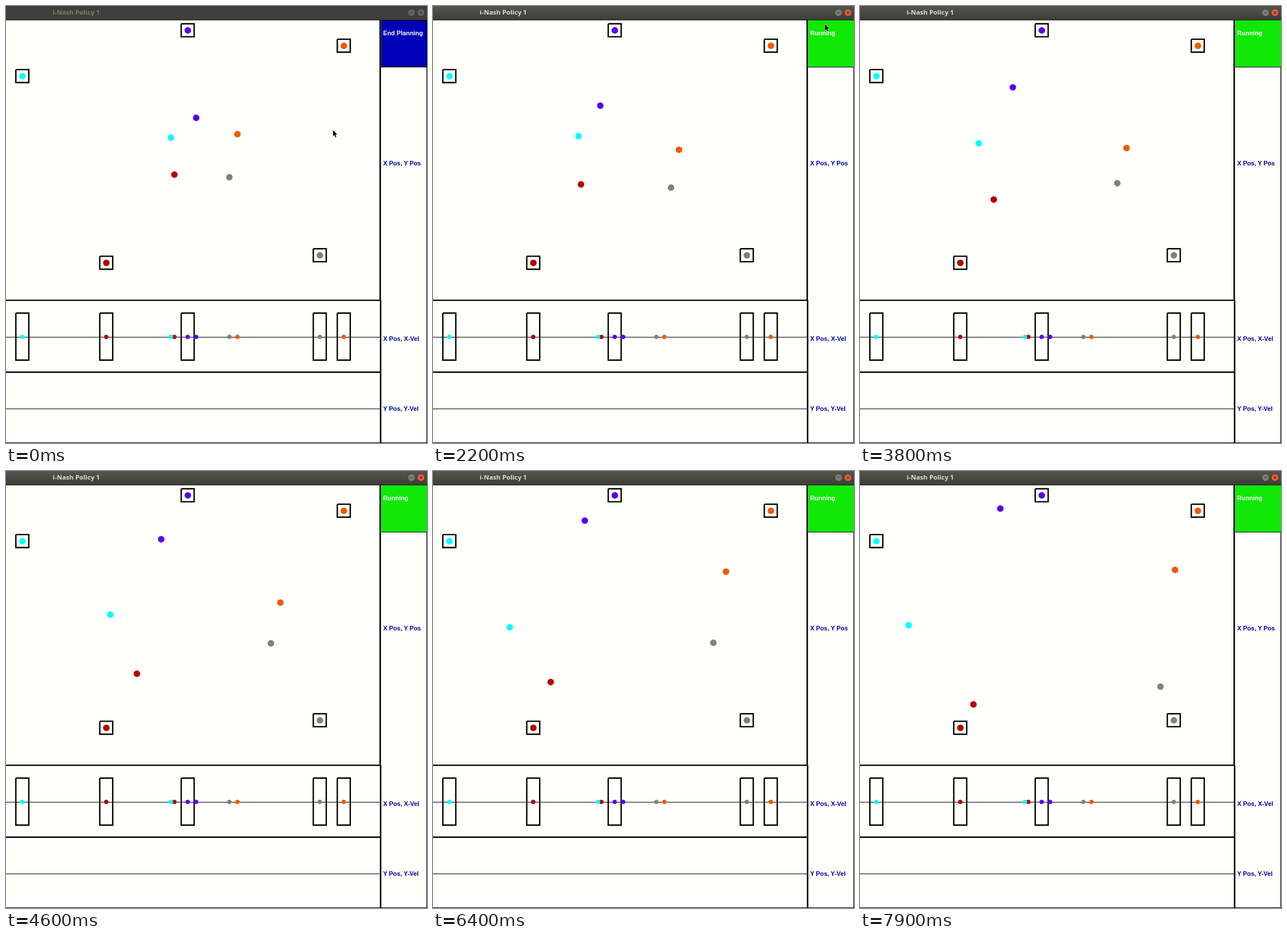
An HTML page for the animation above (8000 ms loop, 735 by 762 pixels).

```html
<!DOCTYPE html>
<html lang="en">
<head>
<meta charset="utf-8">
<title>Policy planner</title>
<style>
  html, body { margin: 0; width: 100%; height: 100%; overflow: hidden; background: #fffffb; }
  svg { display: block; width: 735px; height: 762px; }
  .label { font: bold 10.85px "Liberation Sans", Arial, sans-serif; fill: #0000a0; }
  .title { font: bold 11.4px "Open Sans", "Noto Sans", sans-serif; }
  .box { fill: none; stroke: #000; stroke-width: 2.4; }
</style>
</head>
<body>
<svg id="stage" viewBox="0 0 735 762" xmlns="http://www.w3.org/2000/svg">
  <defs>
    <linearGradient id="bar" x2="0" y2="1">
      <stop offset="0" stop-color="#55544d"/>
      <stop offset="1" stop-color="#3e3d38"/>
    </linearGradient>
  </defs>
  <rect width="735" height="762" fill="#fffffb"/>
  <rect id="head" width="735" height="24"/>
  <rect y="24" width="735" height="1" fill="#1c1c19"/>
  <text id="title" class="title" x="81.5" y="15.3">i-Nash Policy 1</text>
  <g stroke="#34332e" stroke-width=".8">
    <circle id="hide" cx="708" cy="11.5" r="6.5"/>
    <circle id="close" cx="724.5" cy="11.5" r="6.5"/>
  </g>
  <path d="M705 11.5h6M722.2 9.2l4.6 4.6m0-4.6l-4.6 4.6" stroke="#3c3b37" stroke-width="1.2"/>

  <g id="goals"></g>
  <path d="M0 577.5H653M0 702.5H653" stroke="#000"/>
  <g id="strip"></g>
  <path d="M0 513.1H654M0 638.5H654" stroke="#000" stroke-width="2.4"/>
  <path d="M653.3 25V513M654 513V762" stroke="#000" stroke-width="2.6"/>
  <rect id="button" x="655.5" y="25.5" width="79" height="80"/>
  <path d="M655 106.5H734.5V761.5H0" fill="none" stroke="#000"/>
  <text id="state" class="label" x="658.5" y="50.5" style="fill:#fff"></text>
  <text class="label" x="658.5" y="278">X Pos, Y Pos</text>
  <text class="label" x="658.5" y="584">X Pos, X-Vel</text>
  <text class="label" x="658.5" y="706">Y Pos, Y-Vel</text>
  <g id="agents"></g>
  <path id="cursor" d="M0 0V10.6L2.4 8.4L4.1 12.5L5.8 11.8L4.1 7.8H7.4Z" stroke="#fff" paint-order="stroke"/>
</svg>
<script>
const LOOP = 8000, STEP = 100, CLICK = 1100;
const $ = id => document.getElementById(id);

// Each agent steers through a few waypoints, reached at these times.
const times = [1000, 1500, 3000, 4600, 5400, 6400, 7900];
const agents = [
  { color: '#b40000', goal: [175, 447.7],
    x: [294, 279, 239, 228.5, 203, 205.5, 198],
    y: [294, 303, 321, 353.5, 357.5, 368, 407] },
  { color: '#00ffff', goal: [28.5, 122.2],
    x: [288, 272.5, 232.5, 182, 162.5, 134, 85],
    y: [229.5, 225.5, 231.5, 250.5, 270, 272.5, 269] },
  { color: '#5a00f0', goal: [317.2, 42.3],
    x: [332, 318, 268.5, 271, 267, 265, 245],
    y: [195, 181, 164, 119, 112, 86.5, 65.5] },
  { color: '#808080', goal: [547.8, 434.6],
    x: [390, 399, 434, 462.5, 472.5, 489.5, 524.5],
    y: [298.5, 312.5, 316.5, 300.5, 301, 299.5, 376] },
  { color: '#f05a00', goal: [589.7, 69.2],
    x: [404, 413, 448, 479, 476.5, 511.5, 550],
    y: [223.5, 237.5, 258, 229.5, 205, 175.5, 172.5] }
];

function add(parent, tag, attrs) {
  const el = document.createElementNS('http://www.w3.org/2000/svg', tag);
  for (const k in attrs) el.setAttribute(k, attrs[k]);
  return $(parent).appendChild(el);
}

const dot = (parent, cx, cy, r, fill) => add(parent, 'circle', { cx, cy, r, fill });

// The outline stays open at its top left corner.
function frame(x, y, h) {
  add('goals', 'path', { class: 'box', d: `M${x - 11.3} ${y - h}h22.6v${2 * h}h-22.6v${-2 * h}` });
}

for (const a of agents) {
  const [x, y] = a.goal;
  frame(x, y, 11.3);
  frame(x, 576.5, 41);
  a.el = dot('agents', a.x[0], a.y[0], 5.7, a.color);
  dot('agents', x + .2, y + .2, 5.7, a.color);
  for (const sx of [a.x[0], x]) dot('strip', sx, 577, 3.8, a.color);
}

const clamp = v => Math.max(0, Math.min(1, v));
const mix = (a, b, u) => a.map((v, i) => v + (b[i] - v) * u);

function slope(v, i) {
  const a = Math.max(0, i - 1), b = Math.min(times.length - 1, i + 1);
  return (v[b] - v[a]) / (times[b] - times[a]);
}

// Cubic Hermite curve through the waypoints.
function along(v, t) {
  let i = 0;
  while (i < times.length - 2 && t >= times[i + 1]) i++;
  const span = times[i + 1] - times[i];
  const u = clamp((t - times[i]) / span), w = 1 - u;
  return w * w * (1 + 2 * u) * v[i] + u * u * (1 + 2 * w) * v[i + 1]
    + span * u * w * (w * slope(v, i) - u * slope(v, i + 1));
}

function pointer(t) {
  const press = [682, 70];
  if (t < 400) return [571, 216.5];
  if (t < 2000) return mix([595, 193], press, clamp((t - 500) / 400));
  return mix(press, [685, 19], clamp((t - 1900) / 400));
}

function set(id, attrs) {
  for (const k in attrs) $(id).setAttribute(k, attrs[k]);
}

function draw(ms) {
  const t = Math.floor((ms % LOOP) / STEP) * STEP;
  const on = t >= CLICK;
  for (const a of agents) {
    a.el.setAttribute('cx', along(a.x, t));
    a.el.setAttribute('cy', along(a.y, t));
  }
  const button = on ? '#10e806' : '#0000b8';
  set('head', { fill: on ? 'url(#bar)' : '#3f3e3a' });
  set('title', { fill: on ? '#dfdbd2' : '#807e76' });
  set('hide', { fill: on ? '#7d7b74' : '#66645e' });
  set('close', { fill: on ? '#ec5b38' : '#66645e' });
  set('button', { fill: button, stroke: on ? button : '#00004a' });
  $('state').textContent = on ? 'Running' : 'End Planning';
  set('cursor', { transform: `translate(${pointer(t)})`, visibility: t < 2400 ? 'visible' : 'hidden' });
}

const begin = performance.now();
function tick() {
  draw(performance.now() - begin);
  requestAnimationFrame(tick);
}
tick();
</script>
</body>
</html>
```
